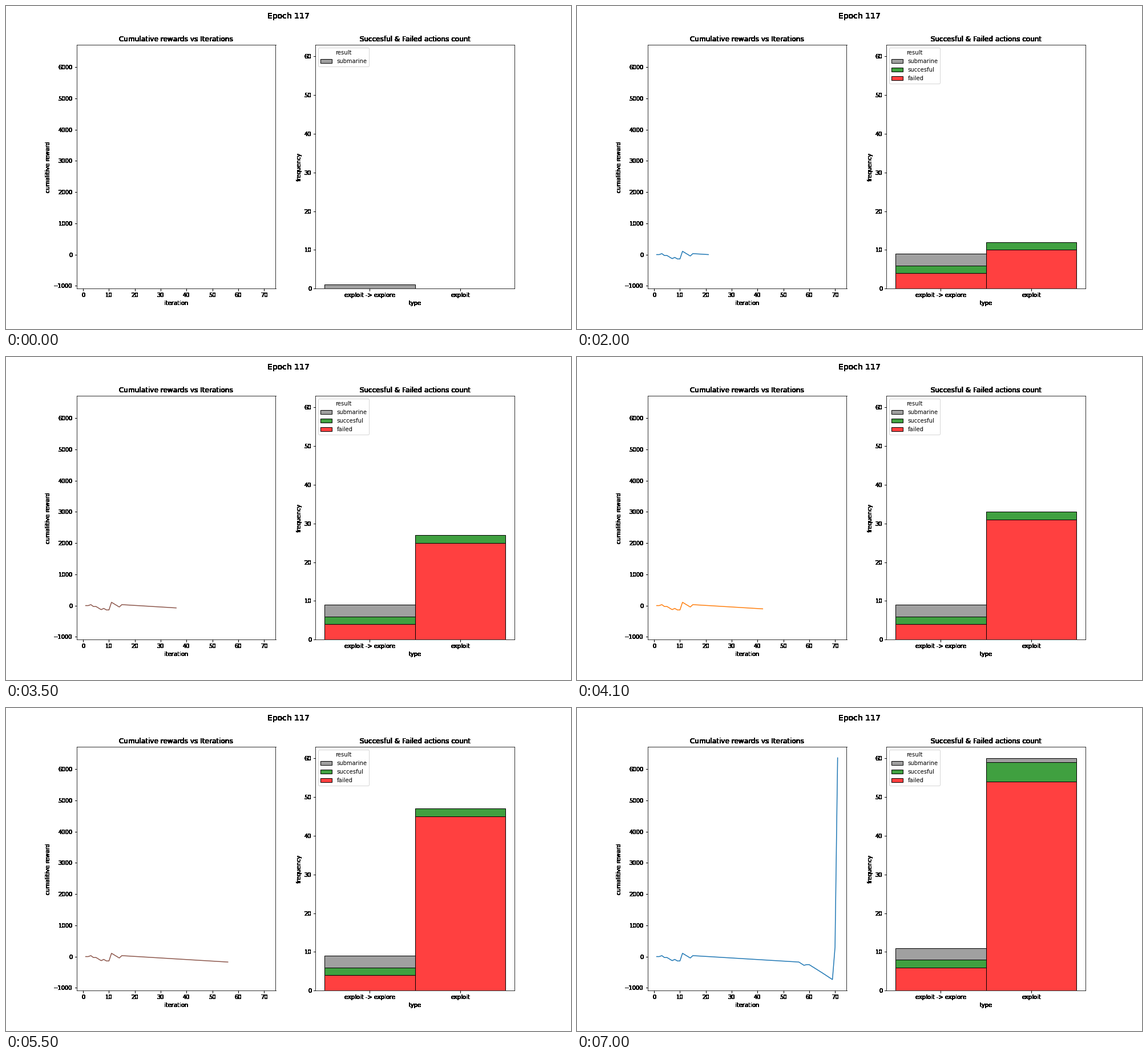
A matplotlib script for the animation above (7.1 s loop, 990 by 566 pixels).

```python
import numpy as np
import matplotlib.pyplot as plt
from matplotlib.animation import FuncAnimation
from matplotlib.colors import to_rgba
from matplotlib.patches import Patch, Rectangle

W, H, DPI = 990, 566, 72
STEP_MS = 100
OVERDRAW = 40

# One code per iteration: action (x = explore, p = exploit) and result
# (m = submarine, s = succesful, f = failed).
STEPS = ("xm xm xs xf pf xf pf xs xf xm ps pf pf xf ps "
         + "pf " * 43 + "ps pm " + "pf " * 7 + "xf xf ps ps").split()
RESULTS = {"m": ("submarine", "gray"),
           "s": ("succesful", "green"),
           "f": ("failed", "red")}

KNOTS = [(1, 0), (2, 0), (3, 30), (4, -30), (5, -30), (7, -130), (8, -90),
         (9, -140), (10, -140), (11, 105), (14, -45), (15, 30), (56, -175),
         (58, -280), (59, -258), (60, -258), (65, -518), (69, -735),
         (70, 300), (71, 6360)]
ITERATIONS = np.arange(1, len(STEPS) + 1)
REWARDS = np.interp(ITERATIONS, *zip(*KNOTS))


def harden(image, dpi):
    """Black text as it looks after being drawn many times over itself."""
    out = np.zeros_like(image)
    out[..., 3] = 1 - (1 - image[..., 3]) ** OVERDRAW
    return out, 0, 0


def padded(low, high):
    pad = 0.05 * (high - low)
    return low - pad, high + pad


def label(ax, title, xlabel, ylabel):
    ax.set_title(title, fontsize=12)
    ax.set_xlabel(xlabel)
    ax.set_ylabel(ylabel)
    for artist in (ax.title, ax.xaxis, ax.yaxis):
        artist.set_agg_filter(harden)


plt.rcParams["font.family"] = "DejaVu Sans"
plt.rcParams["font.size"] = 10

fig, (ax_line, ax_bar) = plt.subplots(
    1, 2, figsize=(W / DPI, H / DPI), dpi=DPI)
fig.subplots_adjust(left=0.125, right=0.9, bottom=0.125, top=0.88, wspace=0.2)
fig.suptitle("Epoch 117", fontsize=14).set_agg_filter(harden)

ax_line.set_xlim(padded(1, len(STEPS)))
ax_line.set_ylim(padded(REWARDS.min(), REWARDS.max()))
label(ax_line, "Cumulative rewards vs Iterations", "iteration",
      "cumalitive reward")
line, = ax_line.plot([], [], lw=1.5)

ax_bar.set_xlim(padded(-0.5, 1.5))
ax_bar.set_ylim(0, 63)
ax_bar.set_xticks([0, 1], ["exploit -> explore", "exploit"])
label(ax_bar, "Succesful & Failed actions count", "type", "frequency")

styles = {key: dict(facecolor=to_rgba(color, 0.75), edgecolor="black", lw=1)
          for key, (_, color) in RESULTS.items()}
handles = [Patch(label=RESULTS[key][0], **styles[key]) for key in "msf"]
bars = {action + key: ax_bar.add_patch(
            Rectangle((x - 0.5, 0), 1, 0, **styles[key]))
        for x, action in enumerate("xp") for key in "msf"}


def update(frame):
    count = frame + 1
    done = STEPS[:count]

    line.set_data(ITERATIONS[:count], REWARDS[:count])
    line.set_color(f"C{frame % 10}")

    for action in "xp":
        base = 0
        for key in "fsm":
            bar = bars[action + key]
            height = done.count(action + key)
            bar.set_y(base)
            bar.set_height(height)
            bar.set_visible(height > 0)
            base += height

    seen = len({step[1] for step in done})
    ax_bar.legend(handles=handles[:seen], title="result", loc="upper left")
    return [line, *bars.values()]


anim = FuncAnimation(fig, update, frames=len(STEPS), interval=STEP_MS,
                     repeat=True, repeat_delay=0, blit=False)
plt.show()
```
